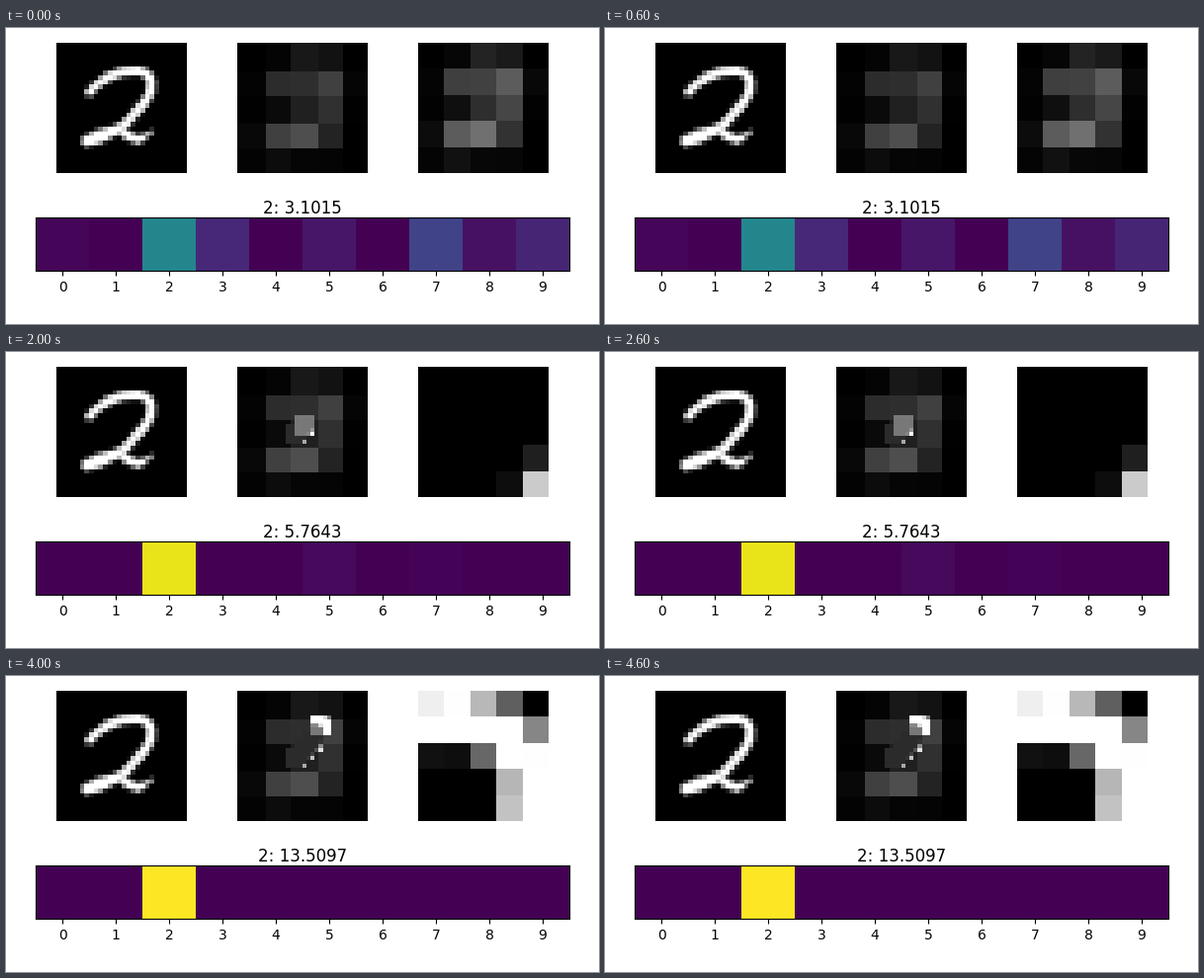
Recreate the animation shown at these times as a matplotlib script. Size 600 px wide and 300 px high, loop 5 s.

```python
import numpy as np
import matplotlib.pyplot as plt
from matplotlib.animation import FuncAnimation

W, H = 600, 300
STEPS = 5
PATCH = 5
CORNERS = [(12, 14), (14, 12), (16, 10), (18, 6)]  # gaze path on the 32 px canvas
SCORES = [3.1015, 4.5011, 5.7643, 8.6097, 13.5097]
# rival digit: (share at the start, how much of it survives)
RIVALS = {0: (0.015, 0), 3: (0.115, 0.33), 5: (0.06, 0.8),
          7: (0.2, 0.46), 8: (0.045, 0), 9: (0.105, 0)}

plt.rcParams["font.family"] = "DejaVu Sans"
fig = plt.figure(figsize=(W / 100, H / 100), dpi=100, facecolor="white")


def axes_px(x, y, w, h):
    return fig.add_axes([x / W, 1 - (y + h) / H, w / W, h / H])


def gray_panel(col, img):
    size = 131.7
    ax = axes_px(51 + 182.85 * col, 15.15, size, size)
    ax.axis("off")
    return ax.imshow(img, cmap="gray", vmin=0, vmax=1, interpolation="nearest")


def stroke(img, pts):
    """Add a tapered soft line through (x, y, half width) points."""
    gy, gx = np.mgrid[:28, :28] + 0.5
    for (ax, ay, aw), (bx, by, bw) in zip(pts, pts[1:]):
        dx, dy = bx - ax, by - ay
        t = np.clip(((gx - ax) * dx + (gy - ay) * dy) / (dx**2 + dy**2), 0, 1)
        dist = np.hypot(gx - ax - t * dx, gy - ay - t * dy)
        np.maximum(img, np.clip(aw + t * (bw - aw) - dist + 0.5, 0, 1), out=img)


def digit_two():
    img = np.zeros((28, 28))
    stroke(img, [(7.1, 10.6, 0.8), (8.5, 9.2, 0.9), (11.2, 7.3, 1), (14.2, 6.2, 1),
                 (17.6, 6.0, 1), (19.5, 6.7, 1), (20.3, 8.2, 1), (20.2, 10.4, 1),
                 (18.9, 12.9, 1), (17.0, 15.0, 1), (15.1, 17.1, 1), (13.6, 18.4, 1),
                 (11.5, 19.2, 1.2), (9.0, 20.2, 1.5), (6.6, 21.1, 1.2)])
    stroke(img, [(13.6, 18.6, 1), (15.4, 20.0, 1), (17.6, 20.8, 0.9),
                 (19.3, 19.9, 0.5), (20.9, 18.9, 0.2)])
    return img


def shrink(img, n):
    """Resize to n x n with a triangle filter."""
    scale = len(img) / n
    centers = (np.arange(n)[:, None] + 0.5) * scale
    k = np.clip(1 - abs(np.arange(len(img)) + 0.5 - centers) / scale, 0, 1)
    k /= k.sum(axis=1, keepdims=True)
    return k @ img @ k.T


def crop(img, corner):
    x, y = (int(0.92 * c - 0.5) for c in corner)  # canvas to digit pixels
    return img[y:y + PATCH, x:x + PATCH]


DIGIT = digit_two()
COARSE = shrink(DIGIT, PATCH)
VIEWS = [COARSE] + [crop(DIGIT, c) for c in CORNERS]


def canvas(step):
    """Coarse view, dimmed earlier glimpses and the bright current one."""
    idx = np.arange(32) * PATCH // 32
    img = 0.7 * COARSE[np.ix_(idx, idx)]
    for k, (x, y) in enumerate(CORNERS[:step], 1):
        lit = 0.47 + VIEWS[k] if k == step else 0.17 + 0.75 * VIEWS[k]
        img[y:y + PATCH, x:x + PATCH] = np.clip(lit, 0, 1)
    return img


def probs(step):
    p = np.zeros(10)
    for digit, (share, keep) in RIVALS.items():
        p[digit] = share * keep ** step**2
    p[2] = 1 - p.sum()
    return [p]


gray_panel(0, DIGIT)
seen = gray_panel(1, canvas(0))
view = gray_panel(2, COARSE)

bar_ax = axes_px(30, 192, 540, 54)
bar = bar_ax.imshow(probs(0), cmap="viridis", vmin=0, vmax=1,
                    aspect="auto", interpolation="nearest")
bar_ax.set_xticks(range(10))
bar_ax.set_yticks([])
title = bar_ax.set_title("", fontsize=12, pad=1.4)


def draw(step):
    seen.set_data(canvas(step))
    view.set_data(VIEWS[step])
    bar.set_data(probs(step))
    title.set_text(f"2: {SCORES[step]:.4f}")
    return seen, view, bar, title


anim = FuncAnimation(fig, draw, frames=STEPS, init_func=lambda: draw(0),
                     interval=1000, repeat=True, repeat_delay=0, blit=False)
plt.show()
```
